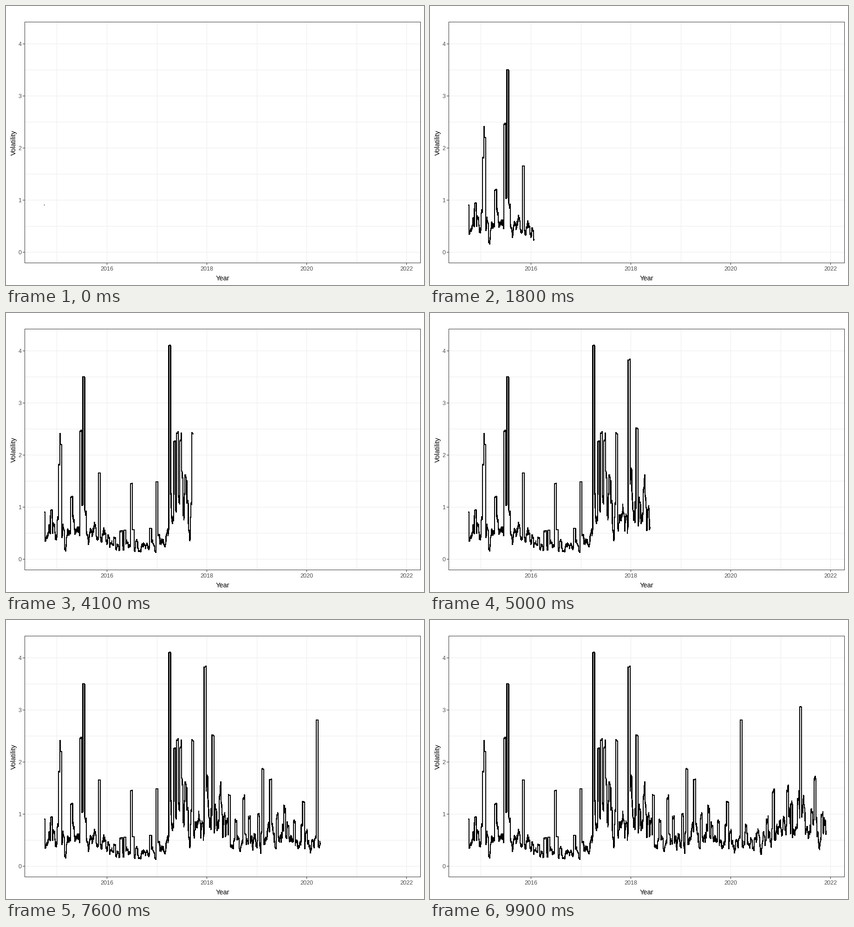
Animation of 900 by 600 pixels, one loop 10000 ms. Source, as a matplotlib script:

```python
import numpy as np
import matplotlib.pyplot as plt
from matplotlib.animation import FuncAnimation

W, H, DPI = 900, 600, 100
PX = 72 / DPI                       # points per pixel
FRAMES, INTERVAL = 100, 100
LEFT, RIGHT, TOP, BOTTOM = 40, 892, 34, 552
DAY = 107.6 / 365.25                # pixels per day
START, END, SPEED = 82, 853.3, 7.815
WINDOW = 14                         # days in the rolling window
GRID, FRAME, TICK = "#ebebeb", "#333333", "#4d4d4d"

# Large shocks: pixel where each enters the window, height
SHOCKS = [
    (80, .9), (113, 1.8), (116, 2.2), (158.6, 2.45), (165.5, 3.5),
    (199, 1.65), (268, 1.45), (323, 1.48), (350.5, 4.1), (361.5, 2.2),
    (367, 2.4), (374, 2.25), (400, 2.4), (426.5, 3.82), (443.5, 2.5),
    (551, 1.85), (567.5, 1.65), (668, 2.8), (796, 3.05), (827, 1.6),
]

# Usual level between them: pixel, height
LEVEL = [
    (82, .5), (170, .8), (245, .32), (340, .36), (360, 1.15), (440, 1.15),
    (480, .8), (600, .82), (715, .55), (760, 1.1), (853, .9),
]


def volatility():
    """Rolling deviation of heavy-tailed seeded returns, plus the shocks."""
    x = np.arange(START, END, DAY)
    rng = np.random.default_rng(12)
    r2 = rng.standard_t(3, len(x) + WINDOW - 1) ** 2 / 3
    roll = np.sqrt(np.convolve(r2, np.ones(WINDOW) / WINDOW, "valid"))
    v4 = (np.interp(x, *zip(*LEVEL)) * np.minimum(roll, 1.7)) ** 4
    for x0, height in SHOCKS:
        v4[(x >= x0) & (x < x0 + WINDOW * DAY)] += height ** 4
    return x, v4 ** .25


def ypix(v):
    return 529 - 112 * v


plt.rcParams.update({"font.family": "Liberation Sans", "path.simplify": False})
fig = plt.figure(figsize=(W / DPI, H / DPI), dpi=DPI, facecolor="white")
ax = fig.add_axes([0, 0, 1, 1])
ax.set(xlim=(0, W), ylim=(H, 0))
ax.axis("off")


def rule(xs, ys, color, z=1):
    ax.plot(xs, ys, color=color, lw=PX, antialiased=False, zorder=z,
            solid_capstyle="butt", snap=True)


def label(x, y, s, size, color, ha="center", **kw):
    ax.text(x, y, s, fontsize=size * PX, color=color, ha=ha, va="baseline", **kw)


for year in range(2015, 2023):
    n = year - 2016
    gx = int(217.2 + DAY * (365 * n + np.ceil(n / 4)))
    rule([gx, gx], [TOP, BOTTOM], GRID)
    if year % 2 == 0:
        rule([gx, gx], [BOTTOM, BOTTOM + 4], FRAME, 4)
        label(gx + .2, 569, str(year), 12.5, TICK)

for k in range(9):
    gy = ypix(k / 2)
    rule([LEFT, RIGHT], [gy, gy], GRID)
    if k % 2 == 0:
        rule([LEFT - 4, LEFT], [gy, gy], FRAME, 4)
        label(33.5, gy + 5.5, str(k // 2), 12.5, TICK, ha="right")

rule([LEFT, RIGHT, RIGHT, LEFT, LEFT], [TOP, TOP, BOTTOM, BOTTOM, TOP], FRAME, 4)
label(466, 590, "Year", 14.67, "black")
label(21, 293.5, "Volatility", 14.67, "black", rotation=90,
      rotation_mode="anchor")

days, vol = volatility()
xs, ys = np.round(days), np.round(ypix(vol))
trace, = ax.plot([], [], color="black", lw=2 * PX, antialiased=False, zorder=3,
                 solid_capstyle="butt", solid_joinstyle="round", snap=False)


def draw(i):
    n = np.searchsorted(days, START + 1.3 + i * SPEED)
    trace.set_data(xs[:n], ys[:n])
    return trace,


anim = FuncAnimation(fig, draw, frames=FRAMES, interval=INTERVAL,
                     repeat=True, repeat_delay=0)
plt.show()
```
